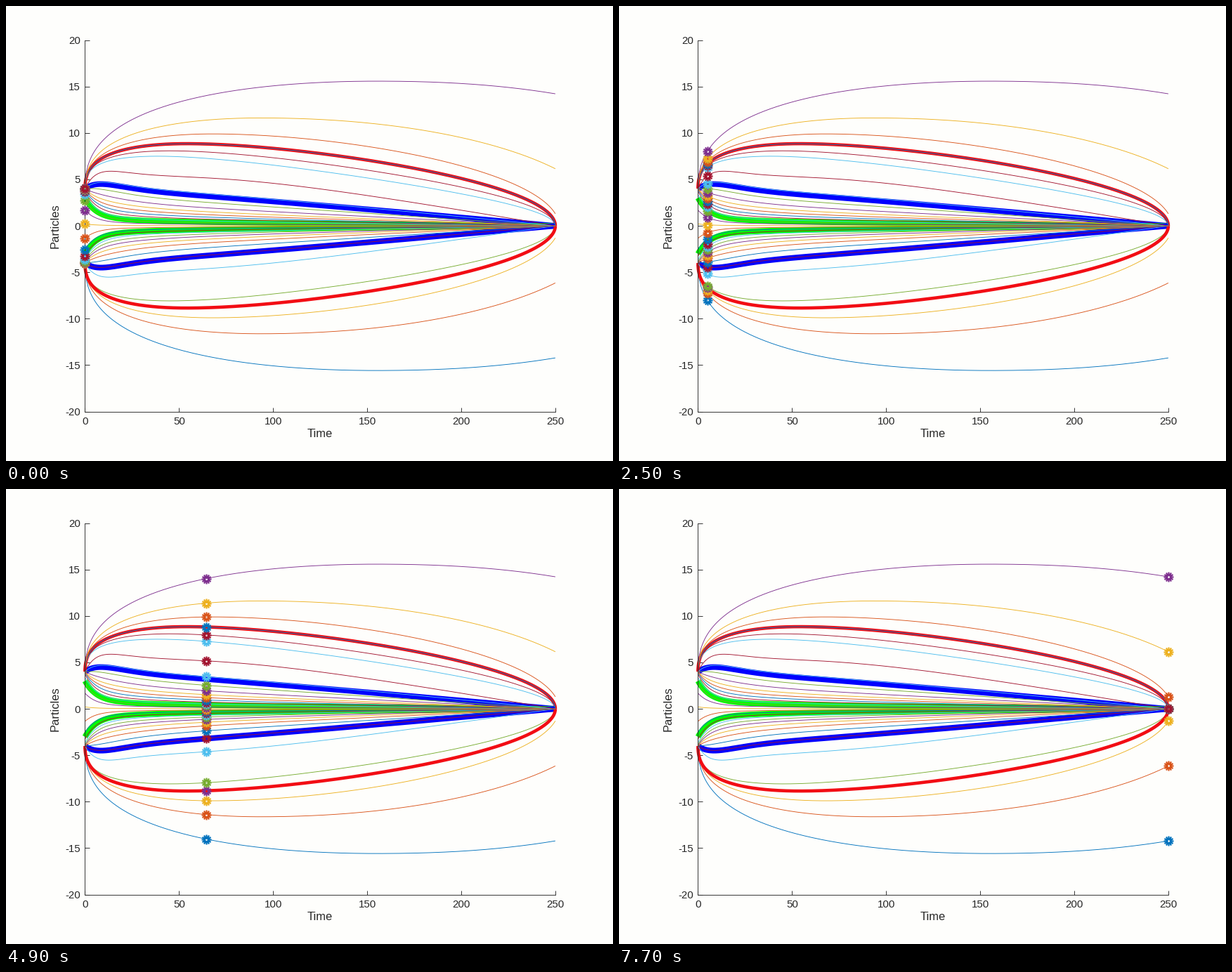
Write a matplotlib script that moves like this. It is 864 by 648 pixels and loops after 7.8 s.

```python
import numpy as np
import matplotlib.pyplot as plt
from matplotlib.animation import FuncAnimation
from matplotlib.path import Path

plt.rcParams["font.family"] = "Liberation Sans"
W, H = 864, 648
INK = "#262626"
PAPER = "#fefefc"
CYCLE = ["#0072bd", "#d95319", "#edb120", "#7e2f8e",
         "#77ac30", "#4dbeee", "#a2142f"]
T_END = 250

# Highest and final distance of the outer paths, outermost first
PEAKS = [15.58, 11.62, 9.9, 8.85, 8.08, 7.5]
ENDS = [14.22, 6.15, 1.3, 0, 0, 0]


def hermite(u, a, b, slope_a, slope_b):
    """Cubic from a to b over u = 0..1 with the given end slopes."""
    return (a + (b - a) * u * u * (3 - 2 * u)
            + u * (1 - u) * (slope_a * (1 - u) - slope_b * u))


def outer_path(j, sign):
    """Squared distance rises to its peak and falls off, along sqrt(t)."""
    peak, end = PEAKS[j] ** 2, ENDS[j] ** 2
    top = np.sqrt(min(.69 * peak, 155))
    drop = (peak - end) * min(2.5, 2.9 - .36 * j)

    def path(t):
        r = np.sqrt(t)
        rise = hermite(r / top, 16, peak, (11 + .034 * peak) * top, 0)
        fall = hermite((r - top) / (np.sqrt(T_END) - top), peak, end, 0, -drop)
        return sign * np.sqrt(np.maximum(np.where(r < top, rise, fall), 0))
    return path


def inner_path(s):
    """A tanh spread relaxes to a Cauchy spread that shrinks to a point."""
    def path(t):
        scale = (1 - t / T_END) * (1.53 + 1.58 / (1 + (t / 32) ** 2))
        width = 3.18 + .76 / (1 + (t / 40) ** 2)
        mix = np.exp(-t / 6)
        return mix * 4 * np.tanh(s) + (1 - mix) * scale * np.tan(s / width)
    return path


low = [(outer_path(j, -1), CYCLE[j]) for j in range(5)]
high = [(outer_path(j, 1), CYCLE[(10 - j) % 7]) for j in range(5, -1, -1)]
inner = [(inner_path(.05 + .4 * k), CYCLE[(k + 2) % 7]) for k in range(-11, 12)]

bands = []
for sign in (1, -1):
    bands += [(inner_path(.98 * sign), "#00ff00", 8),
              (inner_path(3.96 * sign), "#0000ff", 8),
              (outer_path(3, sign), "#f20d14", 4.6)]

# Marker times: small steps near both ends, large ones between
steps = np.repeat([.05, .25, 1, .5, 10, 1, .1], [10, 14, 20, 1, 22, 5, 5])
times = np.minimum(np.concatenate([[0], np.cumsum(steps)]), T_END)

fig = plt.figure(figsize=(W / 72, H / 72), dpi=72, facecolor=PAPER)
ax = fig.add_axes([112.4 / W, 70.4 / H, 669.5 / W, 529 / H], facecolor="none")
ax.set(xlim=(0, T_END), ylim=(-20, 20),
       xticks=range(0, 251, 50), yticks=range(-20, 21, 5))
ax.set_yticklabels([str(v) for v in range(-20, 21, 5)])
ax.spines[["top", "right"]].set_visible(False)
for side in ("left", "bottom"):
    ax.spines[side].set(color=INK, linewidth=.9)
ax.tick_params(direction="in", length=6.5, width=.9, color=INK,
               labelcolor=INK, labelsize=15)
ax.tick_params(axis="x", pad=7)
ax.tick_params(axis="y", pad=6.5)
label = dict(size=16.5, color=INK, ha="center", va="baseline")
fig.text(446.5 / W, 1 - 613.5 / H, "Time", **label)
fig.text(75 / W, 1 - 313 / H, "Particles", rotation=90,
         rotation_mode="anchor", **label)

# Sample times crowd towards both ends, where the paths bend most
grid = T_END * ((1 - np.cos(np.linspace(0, np.pi, 600))) / 2) ** 2


def draw(path, color, width=.9):
    ax.plot(grid, path(grid), color=color, lw=width, clip_on=False,
            solid_capstyle="butt", zorder=2)


for curve in low + bands + high + inner:
    draw(*curve)

# Toothed ring: twelve spokes that merge towards the centre
angles = np.arange(12) * np.pi / 6
spokes = [(r * np.cos(a), r * np.sin(a)) for a in angles for r in (.22, 1)]
gear = Path(spokes, [Path.MOVETO, Path.LINETO] * 12)

particles = low + high + inner
dots = [ax.plot([], [], marker=gear, ms=14, mew=2.2, mec=color, mfc="none",
                ls="none", clip_on=False, zorder=5)[0]
        for _, color in particles]


def update(n):
    t = times[n]
    for dot, (path, _) in zip(dots, particles):
        dot.set_data([t], [float(path(t))])
    return dots


anim = FuncAnimation(fig, update, frames=len(times), interval=100,
                     repeat=True, repeat_delay=0, blit=False)
plt.show()
```
